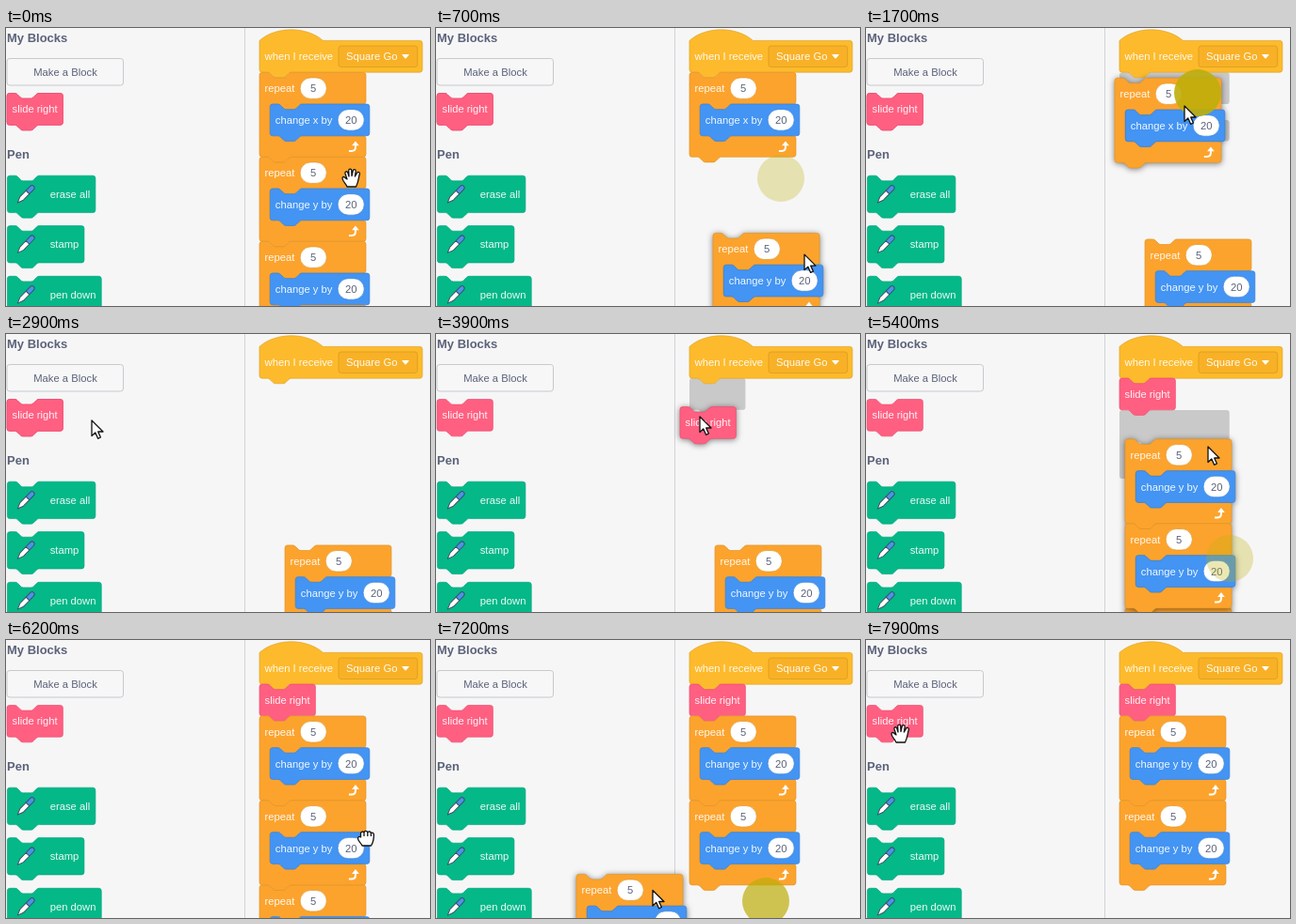
Recreate the animation shown at these times as an HTML page. Size 450 by 296 pixels, loop 8000 ms.

```html
<!DOCTYPE html>
<html lang="en">
<head>
<meta charset="utf-8">
<title>Rearranging code blocks</title>
<style>
  html, body { margin: 0; width: 100%; height: 100%; overflow: hidden; background: #f6f6f7; }
  svg { display: block; width: 450px; height: 296px; }
  text { font: 16px "Liberation Sans", Arial, sans-serif; fill: rgba(255, 255, 255, .93); }
  .dark { fill: #5b6278; }
  .button { font-size: 11.25px; }
  .heading { font-size: 13px; font-weight: bold; }
  .control { fill: #fca32d; stroke: #e0952a; }
  .motion { fill: #4394f3; stroke: #3a80d4; }
  .event { fill: #fdba2c; stroke: #dda422; }
  .field { fill: #f8b127; stroke: #d59a1c; }
  .custom { fill: #ff5f81; stroke: #ec4f71; }
  .pen { fill: #04b888; stroke: #08a67d; }
  .marker { fill: #c9c9ca; }
  .lifted { filter: drop-shadow(0 1px 3px rgba(0, 0, 0, .5)); }
  .cursor { fill: #fff; stroke: #111; stroke-width: 1.3; stroke-linejoin: round; }
</style>
</head>
<body>
<svg id="stage" viewBox="0 0 450 296"></svg>
<script>
const LOOP = 8000, STEP = 100, SCALE = 0.703;
const stage = document.getElementById("stage");

function add(parent, tag, attrs = {}, text) {
  const node = document.createElementNS("http://www.w3.org/2000/svg", tag);
  for (const key in attrs) node.setAttribute(key, attrs[key]);
  if (text) node.textContent = text;
  parent.append(node);
  return node;
}

const place = (node, x, y) => node.setAttribute("transform", `translate(${x} ${y})`);
const show = (node, on) => { node.style.display = on ? "" : "none"; };

// Block outlines, in block units
const NOTCH = "c2 0 3 1 4 2l4 4c1 1 2 2 4 2h12c2 0 3-1 4-2l4-4c1-1 2-2 4-2";
const NUB = "c-2 0-3 1-4 2l-4 4c-1 1-2 2-4 2h-12c-2 0-3-1-4-2l-4-4c-1-1-2-2-4-2";
const TOP = `M0 4a4 4 0 0 1 4-4H12${NOTCH}`;
const END = `H48${NUB}h-8a4 4 0 0 1-4-4z`;
const side = (w, h) => `H${w - 4}a4 4 0 0 1 4 4v${h - 8}a4 4 0 0 1-4 4`;

const plainPath = (w, h = 48) => TOP + side(w, h) + END;
const hatPath = w => `M0 0c25-22 71-22 96 0${side(w, 48)}${END}`;
const loopPath = (w, inner) => TOP + side(w, 48) +
  `H64${NUB}h-8a4 4 0 0 0-4 4v${inner - 8}a4 4 0 0 0 4 4h8${NOTCH}` + side(w, 32) + END;

function group(x, y, parent = stage) {
  const node = add(parent, "g");
  place(node, x, y);
  return node;
}

// A group that draws in block units
function units(parent, x = 0, y = 0) {
  return add(parent, "g", { transform: `translate(${x} ${y}) scale(${SCALE})` });
}

function label(g, x, mid, text) {
  add(g, "text", { x, y: mid + 5.8 }, text);
}

function oval(g, x, text, kind) {
  add(g, "rect", { x, y: 8, width: 40, height: 32, rx: 16, class: kind, style: "fill:#fff" });
  add(g, "text", { x: x + 20, y: 29.8, "text-anchor": "middle", class: "dark" }, text);
}

function addLoop(parent, y, axis) {
  const g = units(parent, 0, y);
  add(g, "path", { d: loopPath(160.7, 48), class: "control" });
  label(g, 8, 24, "repeat");
  oval(g, 61.4, "5", "control");
  add(g, "path", { d: "M135 119h4q6 0 6-6v-3", fill: "none", stroke: "#fff", "stroke-width": 2.8 });
  add(g, "path", { d: "M139.5 111l5.5-7 5.5 7z", fill: "#fff" });
  const inner = add(g, "g", { transform: "translate(16 48)" });
  add(inner, "path", { d: plainPath(150.2), class: "motion" });
  label(inner, 8, 24, `change ${axis} by`);
  oval(inner, 102.2, "20", "motion");
}

function addCustom(parent) {
  const g = units(parent);
  add(g, "path", { d: plainPath(84.5), class: "custom" });
  label(g, 8, 24, "slide right");
}

function addPen(y, text, width) {
  const g = units(stage, 1.4, y);
  add(g, "path", { d: plainPath(width, 56), class: "pen" });
  const pen = add(g, "g", {
    transform: "translate(28 28) rotate(44)", stroke: "#3f5068", "stroke-width": 1.4, "stroke-linejoin": "round"
  });
  add(pen, "path", { d: "M-3.6-4h7.2V9L0 18-3.6 9z", fill: "#fff" });
  add(pen, "path", { d: "M-3.6-4v-9q0-4 3.6-4t3.6 4v9z", fill: "#4a94ea" });
  label(g, 64.5, 28, text);
}

// Palette
add(stage, "rect", { width: 450, height: 296, fill: "#f6f6f7" });
add(stage, "path", { d: "M253.5 0V296", stroke: "#d2d3d5" });
add(stage, "text", { x: 1, y: 15, class: "dark heading" }, "My Blocks");
add(stage, "rect", { x: 1, y: 32.5, width: 123.5, height: 28.5, rx: 3, fill: "#f7f7f8", stroke: "#c8c9cc" });
add(stage, "text", { x: 63, y: 50.5, "text-anchor": "middle", class: "dark button" }, "Make a Block");
addCustom(group(1, 69.5));
add(stage, "text", { x: 1, y: 139, class: "dark heading" }, "Pen");
addPen(157.2, "erase all", 133);
addPen(210.6, "stamp", 116);
addPen(264.3, "pen down", 142);

// Landing shadows
const shadows = {
  loop: add(units(stage), "path", { d: loopPath(166, 24), class: "marker" }),
  plain: add(units(stage), "path", { d: plainPath(84.5), class: "marker" })
};

// Workspace
const hat = units(stage, 269, 13.4);
add(hat, "path", { d: hatPath(246), class: "event" });
label(hat, 8, 24, "when I receive");
add(hat, "rect", { x: 119.5, y: 8, width: 119, height: 32, rx: 4, class: "field" });
label(hat, 131, 24, "Square Go");
add(hat, "path", { d: "M216 21.5h9l-4.5 5z", fill: "#fff", stroke: "#fff", "stroke-width": 1.5, "stroke-linejoin": "round" });

function part(x, y, fill) {
  const node = group(x, y);
  fill(node);
  return { node, x, y };
}
const slide = part(1, 69.5, addCustom);
const last = part(269, 317.3, g => addLoop(g, 0, "x"));
const pair = part(269, 137.3, g => { addLoop(g, 0, "y"); addLoop(g, 90, "y"); });
const first = part(269, 47.3, g => addLoop(g, 0, "x"));
const parts = [slide, last, pair, first];

const ring = add(stage, "circle", { r: 25, fill: "#beae0a" });
const cursors = {
  arrow: "M0 0V16.5L3.8 13 6.6 19.3 9.4 18 6.7 12H12z",
  hand: "M-4 9C-5 6-9 3-9 0-9-2-7-2-5.5 0L-4 1-6-5c-.6-2.5 2-3 2.8-1L-2-2-2.3-8c0-2.4 3-2.4 3.1 0L1-2.5 2.2-8c.5-2.2 3.2-1.8 3 .4L4.4-2 6.5-5.5c1-2 3.4-1 2.8 1C8 0 8 4 5.5 9z",
  fist: "M-4 9C-5 6-9 4-8.5 1-8-1-6-1-5.5 0V-4c0-2.5 3-2.5 3.5-.8 .4-2.4 3.4-2.2 3.8 0 .8-2 3.4-1.4 3.6 .6 1-1.2 3-.6 3 1.4C8.5 2 8 5 5.5 9zM-2-5v4M1.8-5v4M5.4-4v3"
};
for (const kind in cursors) cursors[kind] = add(stage, "path", { d: cursors[kind], class: "cursor" });

// Pointer path: time, x, y
const route = [
  [0, 366, 160], [200, 366, 160], [800, 393, 247.6], [1000, 393, 247.6],
  [1500, 343, 77], [1700, 338, 83], [2300, 105, 98], [2500, 105, 98], [2900, 91, 92],
  [3100, 22, 80], [3200, 22, 80], [3900, 280, 88], [4100, 290, 62], [4300, 290, 62],
  [4800, 384, 233], [4900, 384, 233], [5400, 363, 120], [5600, 357, 92], [5700, 357, 92],
  [6200, 382, 210], [6700, 350, 278], [6900, 350, 278], [7500, 110, 255], [7600, 110, 255],
  [7800, 36, 100], [8000, 36, 100]
];

// Each drag ends with a shift of its parts, or removes them
const drags = [
  { from: 200, to: 900, parts: [pair, last], shift: [27, 87.6] },
  { from: 1500, to: 2400, parts: [first], dot: [352, 69] },
  { from: 3200, to: 4200, parts: [slide], shift: [268, -22.4] },
  { from: 4900, to: 5600, parts: [pair, last], shift: [-27, -144], dot: [386, 239] },
  { from: 6900, to: 7600, parts: [last] }
];

// Shadow spans: from, to, shape, y
const landings = [
  [300, 400, "loop", 137.3], [1600, 1800, "loop", 47.3], [3700, 4200, "plain", 47.1],
  [5300, 5600, "loop", 80.9], [7000, 7100, "loop", 260.9]
];
const handSpans = [[0, 300], [900, 1100], [1400, 1600], [3000, 3300], [4200, 4400], [4700, 5000], [5600, 7000], [7700, LOOP]];
const fistSpans = [[200, 300], [1500, 1600], [3200, 3300], [4900, 5000], [6200, 6300], [6900, 7000]];

const within = (t, spans) => spans.find(([from, to]) => t >= from && t < to);

function pointer(t) {
  const i = route.findIndex(key => key[0] > t);
  const [t0, x0, y0] = route[i - 1], [t1, x1, y1] = route[i];
  const u = (t - t0) / (t1 - t0), e = u * u * (3 - 2 * u);
  return [x0 + (x1 - x0) * e, y0 + (y1 - y0) * e];
}

function placePart(p, t, [px, py]) {
  let { x, y } = p, lifted = false, present = true;
  for (const drag of drags) {
    if (t < drag.from || !drag.parts.includes(p)) continue;
    let shift = drag.shift;
    if (t < drag.to) {
      const [gx, gy] = pointer(drag.from);
      shift = [px - gx, py - gy];
      lifted = t > drag.from;
    }
    if (shift) { x += shift[0]; y += shift[1]; }
    else present = false;
  }
  place(p.node, x, y);
  p.node.classList.toggle("lifted", lifted);
  show(p.node, present);
}

function draw(t) {
  const at = pointer(t);
  parts.forEach(p => placePart(p, t, at));

  const landing = within(t, landings);
  for (const kind in shadows) show(shadows[kind], landing && landing[2] === kind);
  if (landing) {
    const [, , kind, y] = landing;
    shadows[kind].parentNode.setAttribute("transform", `translate(269 ${y}) scale(${SCALE})`);
  }

  const press = drags.find(d => t >= d.from && t < d.from + 650);
  show(ring, press);
  if (press) {
    place(ring, ...(press.dot || pointer(press.from)));
    ring.setAttribute("opacity", Math.min(0.9, (press.from + 650 - t) / 500));
  }

  const look = within(t, fistSpans) ? "fist" : within(t, handSpans) ? "hand" : "arrow";
  for (const kind in cursors) show(cursors[kind], kind === look);
  place(cursors[look], ...at);
}

const start = performance.now();
function tick() {
  const t = (performance.now() - start) % LOOP;
  draw(Math.floor(t / STEP) * STEP);
  requestAnimationFrame(tick);
}
tick();
</script>
</body>
</html>
```
